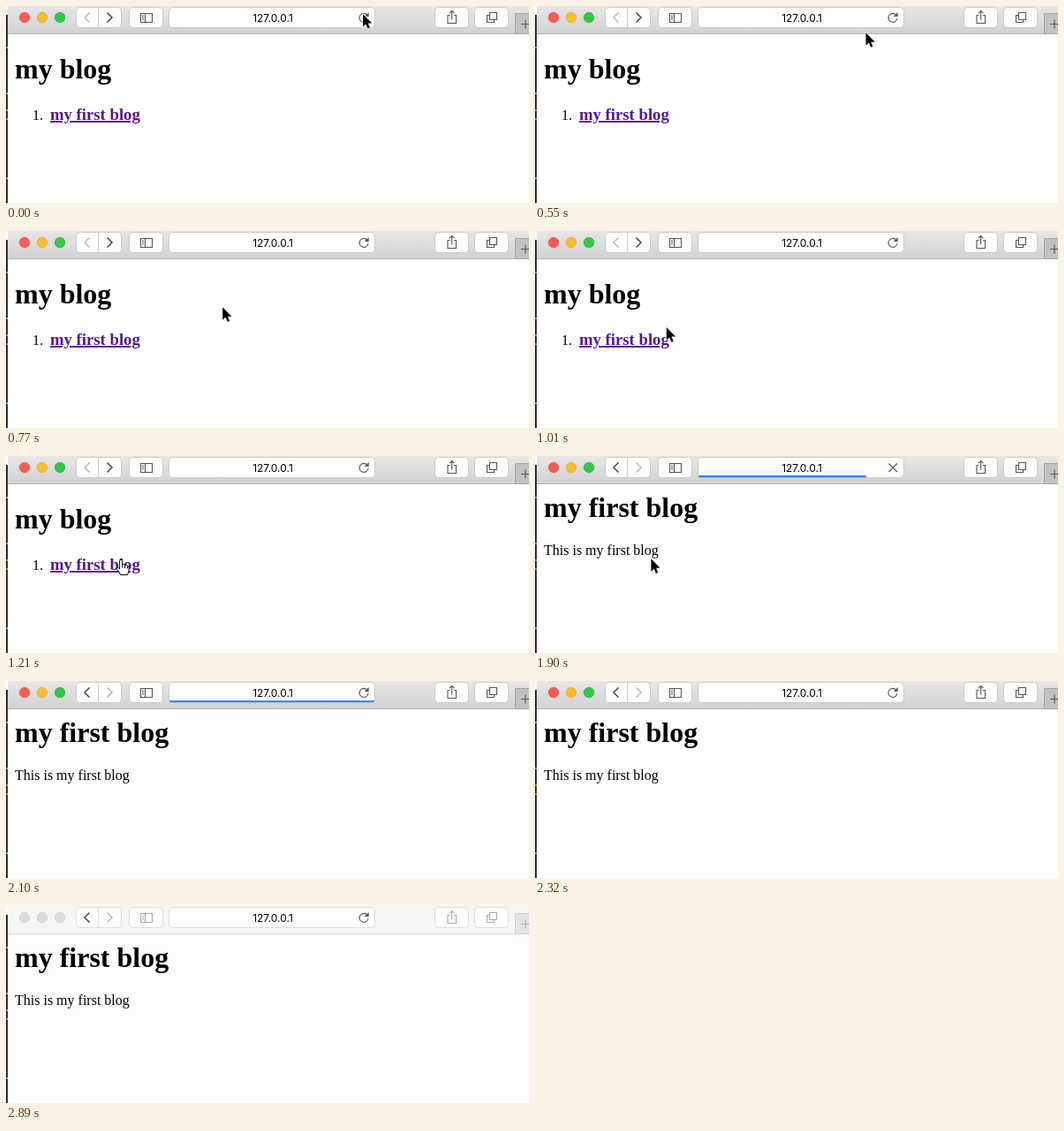
Write an HTML page that moves like this. It is 592x223 px and loops after 2.97 s.

```html
<!DOCTYPE html>
<html lang="en">
<head>
<meta charset="utf-8">
<title>my blog</title>
<style>
  html, body { margin: 0; width: 100%; height: 100%; overflow: hidden; background: #fff; }
  svg { display: block; width: 592px; height: 223px; }
  .serif { font-family: "Liberation Serif", "Times New Roman", serif; font-size: 16px; }
  h1, .h1 { font-size: 32px; font-weight: bold; }
  #link { font-size: 18.72px; font-weight: bold; fill: #551a8b; text-decoration: underline; font-variant-ligatures: none; }
  #link.active { fill: #e00; }
  .url { font: 12px Inter, Roboto, sans-serif; text-anchor: middle; }
  .button { fill: #fdfdfd; stroke: #c3c1c3; stroke-width: .8; }
  .icon { fill: none; stroke: #555; stroke-width: 1.1; }
  .chevron { fill: none; stroke: #4a4a4a; stroke-width: 1.5; }
  .off { stroke: #bbb; }
  .inactive .button { stroke: #d6d6d6; }
  .inactive .dim { stroke: #aaa; }
  .inactive .light { fill: #dcdcdc; stroke: #cbcbcb; }
  .inactive #bar { fill: #f6f6f6; }
  .inactive #edge { fill: #d8d8d8; }
  .inactive #tab { fill: #e4e4e4; stroke: #cfcfcf; }
  .inactive #paper { fill: #fdfdfd; }
</style>
</head>
<body>
<svg id="stage" viewBox="0 0 592 223">
  <defs>
    <linearGradient id="chrome" x2="0" y2="1">
      <stop stop-color="#e8e6e8"/><stop offset="1" stop-color="#d3d1d3"/>
    </linearGradient>
    <clipPath id="field"><rect x="184.5" y="1.5" width="233" height="23" rx="4"/></clipPath>
  </defs>

  <rect id="paper" width="592" height="223" fill="#fefefe"/>
  <rect y="10" width="2" height="213" fill="#2c2c30"/>
  <path d="M0 47h2M0 99h2M0 195h2" stroke="#999" stroke-width="2"/>
  <path d="M0 118h2M0 128h2" stroke="#b98a2c" stroke-width="2"/>

  <path id="bar" d="M2 0H592V31H2Z" fill="url(#chrome)"/>
  <rect id="edge" x="2" y="31" width="590" height="1" fill="#b4b2b4"/>
  <path id="tab" d="M576.5 31.5V8.5H593V31.5Z" fill="#c3c1c3" stroke="#a5a3a5"/>
  <path class="icon dim" d="M583 20.5H593M588 15.5V25.5"/>

  <circle class="light" cx="21" cy="13" r="5.8" fill="#fc5b55" stroke="#e0443e" stroke-width=".6"/>
  <circle class="light" cx="41" cy="13" r="5.8" fill="#fabd2f" stroke="#dea123" stroke-width=".6"/>
  <circle class="light" cx="61" cy="13" r="5.8" fill="#33c748" stroke="#1aab29" stroke-width=".6"/>

  <g class="button">
    <rect x="79.5" y="1.5" width="51" height="23" rx="4"/>
    <path d="M104.5 1.5V24.5"/>
    <rect x="139.5" y="1.5" width="38" height="23" rx="4"/>
    <rect x="184.5" y="1.5" width="233" height="23" rx="4"/>
    <rect x="485.5" y="1.5" width="38" height="23" rx="4"/>
    <rect x="530.5" y="1.5" width="38" height="23" rx="4"/>
  </g>
  <path id="back" class="chevron" d="M94.5 7.5L89 13L94.5 18.5"/>
  <path id="next" class="chevron" d="M114.5 7.5L120 13L114.5 18.5"/>
  <path class="icon dim" d="M152.5 8.5H165.5V18.5H152.5ZM157.5 8.5V18.5M154 11H156M154 13H156M154 15H156"/>
  <path class="icon dim" d="M502.5 10.5H500V19.5H509.5V10.5H507M504.7 15.5V5.5M502 8.2L504.7 5.5L507.4 8.2"/>
  <path class="icon dim" d="M547.5 10.5H544.5V18.5H552.5V15.5M547.5 7.5H555.5V15.5H547.5Z"/>

  <text class="url" x="302" y="18">127.0.0.1</text>
  <g id="reload">
    <path class="icon" d="M408.8 10.1A5 5 0 1 0 410 14"/>
    <path d="M410.6 7V12H405.8Z" fill="#555"/>
  </g>
  <path id="stop" class="icon" d="M400.5 8.5L410 18M410 8.5L400.5 18"/>
  <rect id="progress" x="184.5" y="22" height="2.4" fill="#2f7cf6" clip-path="url(#field)"/>

  <g id="list" class="serif">
    <text class="h1" x="10" y="82">my blog</text>
    <text x="30" y="129">1.</text>
    <text id="link" x="50" y="129">my first blog</text>
  </g>
  <g id="post" class="serif">
    <text class="h1" x="10" y="69">my first blog</text>
    <text x="10" y="112">This is my first blog</text>
  </g>

  <g id="cursor" stroke-linejoin="round">
    <path id="arrow" d="M0 0V14.5L3.3 11.4L5.6 16.6L7.9 15.6L5.7 10.5H10.2Z" stroke="#fff" stroke-width="1.4" paint-order="stroke"/>
    <path id="hand" d="M-1.5 10V2Q-1.5 .2 0 .2T1.6 2V6.5Q2 5.4 3.2 5.6T4.5 7Q5 6 6 6.3T7.2 7.8Q8.8 7 9 9V12.5Q8.6 15 7.5 17.5H-.5Q-1.2 15 -4.8 11.3Q-5.6 9.8 -4.3 9.4T-1.5 11ZM1.6 6.5V9.5M4.5 7V10M7.2 7.8V10.5" fill="#fff" stroke="#000"/>
  </g>
</svg>

<script>
const LOOP = 2970, PRESS = 1540, START = 1650, SWAP = 1710, DONE = 2050, BLUR = 2890;
const $ = id => document.getElementById(id);

// Rows of [time, x, y]
const path = [
  [0, 404, 9], [30, 404, 9], [50, 397, 13], [350, 397, 13], [450, 391, 19],
  [550, 375, 30], [650, 328, 52], [750, 255, 83], [870, 199, 101], [900, 197, 101],
  [1010, 149, 109], [1100, 134, 115], [1300, 127, 118.5], [SWAP, 127, 118.5],
  [1800, 130, 116], [1900, 130, 116], [1960, 215, 135], [DONE, 500, 226]
];
const growth = [[START, 0], [1750, 120], [1900, 190], [DONE, 233]];

function at(rows, t) {
  if (t <= rows[0][0]) return rows[0].slice(1);
  const i = rows.findIndex(r => r[0] > t);
  if (i < 0) return rows.at(-1).slice(1);
  const a = rows[i - 1], b = rows[i], k = (t - a[0]) / (b[0] - a[0]);
  return a.slice(1).map((v, j) => v + (b[j + 1] - v) * k);
}

const show = (id, on) => $(id).style.display = on ? "" : "none";

function draw(t) {
  const opened = t >= SWAP, loading = t >= START && t < DONE;
  const [x, y] = at(path, t);
  const over = !opened && x < 152 && y > 112;

  show("list", !opened);
  show("post", opened);
  $("link").classList.toggle("active", t >= PRESS);
  $("back").classList.toggle("off", !opened);
  $("next").classList.toggle("off", opened);

  show("reload", !loading);
  show("stop", loading);
  $("progress").setAttribute("width", at(growth, t)[0]);
  $("progress").setAttribute("opacity", Math.max(0, Math.min(1, (2300 - t) / 220)));

  $("cursor").setAttribute("transform", `translate(${x} ${y})`);
  show("cursor", t < DONE);
  show("arrow", !over);
  show("hand", over);
  $("stage").classList.toggle("inactive", t >= BLUR);
}

const begin = performance.now();
function tick() {
  draw((performance.now() - begin) % LOOP);
  requestAnimationFrame(tick);
}
tick();
</script>
</body>
</html>
```
